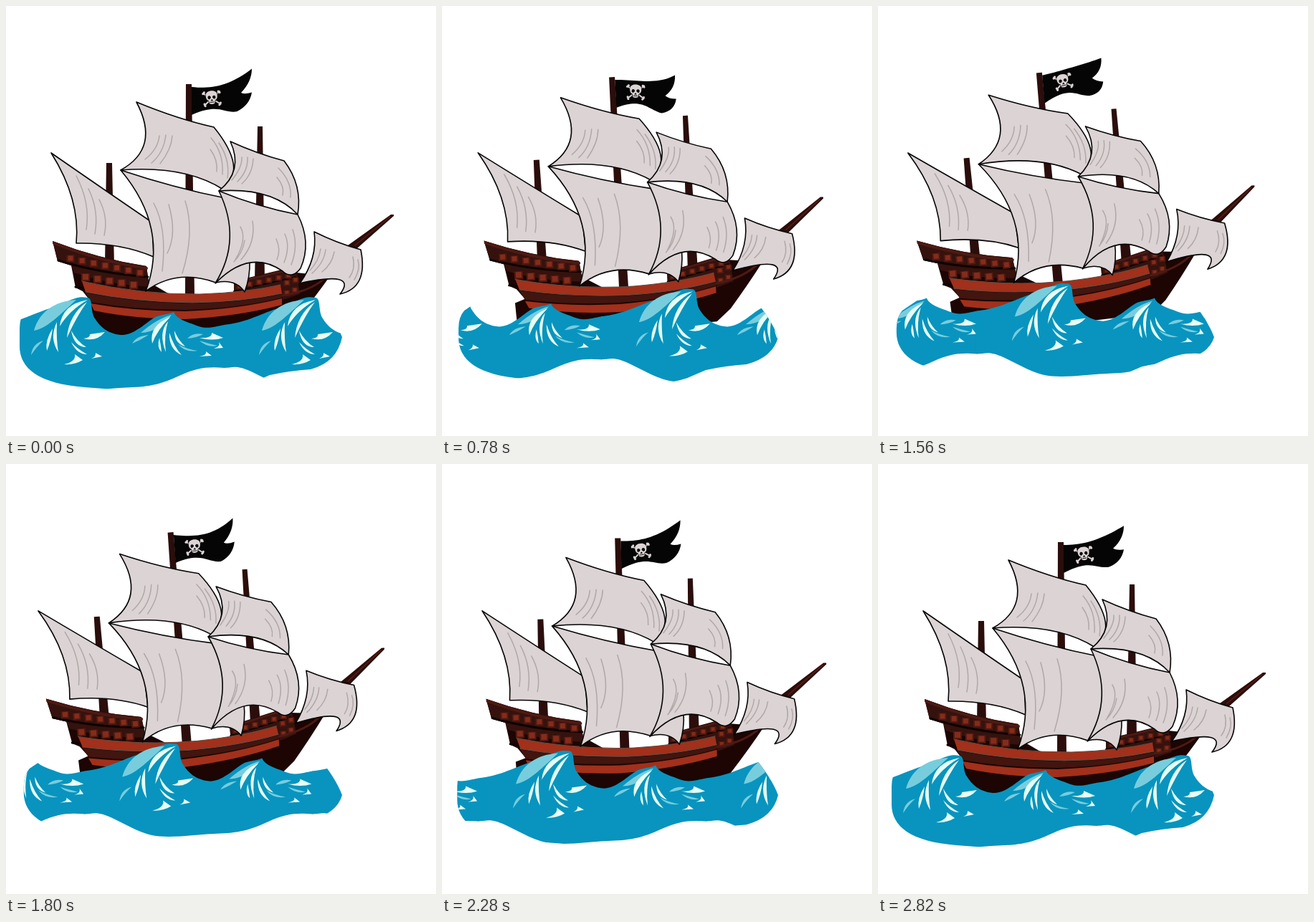
Recreate the animation shown at these times as an HTML page with a canvas. Size 600 by 600 pixels, loop 2880 ms.

```html
<!DOCTYPE html>
<html lang="en">
<head>
<meta charset="utf-8">
<title>Pirate ship</title>
<style>
html, body { margin: 0; width: 100%; height: 100%; overflow: hidden; background: #fff; }
canvas { display: block; }
</style>
</head>
<body>
<canvas id="stage" width="600" height="600"></canvas>
<script>
const ctx = document.getElementById('stage').getContext('2d');
const STEP = 60, COUNT = 48, PERIOD = 318, TAU = Math.PI * 2;
const WOOD = '#2b0e0b', DARK = '#1c0503', RED = '#a2301b', SAIL = '#dcd3d4', BLACK = '#050505';

function fill(path, color) {
  ctx.fillStyle = color;
  ctx.fill(new Path2D(path));
}

function line(path, color, width) {
  ctx.strokeStyle = color;
  ctx.lineWidth = width;
  ctx.stroke(new Path2D(path));
}

function sail(path, folds) {
  fill(path, SAIL);
  line(path, BLACK, 1.6);
  if (folds) line(folds, '#b0a8a8', 1.5);
}

// Row of gun ports along a straight line
function ports(count, x0, y0, x1, y1, size) {
  for (let i = 0; i < count; i++) {
    const f = i / (count - 1), x = x0 + (x1 - x0) * f, y = y0 + (y1 - y0) * f;
    ctx.fillStyle = '#52190f';
    ctx.fillRect(x - size / 2 - 2, y - size / 2 - 1, size + 4, size + 3);
    ctx.fillStyle = '#842c1c';
    ctx.fillRect(x - size / 2, y - size / 2, size, size);
  }
}

function drawSkull() {
  ctx.scale(0.9, 0.9);
  line('M-13 -8 L13 11 M13 -9 L-12 11', SAIL, 2.2);
  ctx.fillStyle = SAIL;
  for (const [x, y] of [[-13, -7], [-11, -9], [13, -7], [11, -9], [-12, 9], [-11, 12], [13, 9], [11, 12]]) {
    ctx.beginPath();
    ctx.arc(x, y, 1.7, 0, TAU);
    ctx.fill();
  }
  const head = 'M-9 -4 C-9 -13 9 -13 9 -4 Q9 3 5 4 L4 9 Q0 11 -4 9 L-5 4 Q-9 3 -9 -4Z';
  line(head, BLACK, 1.5);
  fill(head, SAIL);
  fill('M-6 -2 Q-3 -5 -1 -1 Q-3 4 -6 1Z M6 -2 Q3 -5 1 -1 Q3 4 6 1Z M0 2 L2 5 L-2 5Z', BLACK);
  line('M-3 7 H3', BLACK, 1);
}

function drawFlag(n) {
  const phase = n * 5 / COUNT;
  const lift = s => -14 * s ** 3 - 13 * s * Math.cos(TAU * (phase - 0.64 - 0.28 * s));
  ctx.save();
  ctx.translate(259, 113);
  ctx.beginPath();
  ctx.moveTo(0, 0);
  for (let s = 0.05; s < 1.01; s += 0.05) ctx.lineTo(84 * s, lift(s));
  ctx.quadraticCurveTo(84, lift(1) + 18, 69, lift(0.82) + 23);
  ctx.quadraticCurveTo(74, lift(0.88) + 29, 84, lift(1) + 33);
  ctx.quadraticCurveTo(81, lift(0.95) + 48, 63, lift(0.75) + 46);
  ctx.bezierCurveTo(44, lift(0.5) + 40, 38, lift(0.4) + 23, 0, 39);
  ctx.closePath();
  ctx.fillStyle = BLACK;
  ctx.fill();
  ctx.translate(28, 15 + lift(0.33));
  ctx.rotate((lift(0.5) - lift(0.15)) / 40);
  drawSkull();
  ctx.restore();
}

function drawHull() {
  fill('M541 291 L537 291 L484 329 L400 388 L420 394 L490 338 L541 293Z', WOOD);
  line('M536 294 L487 334', '#5a1c13', 1.5);
  fill('M65 328 L72 356 L91 362 L97 393 L107 398 L118 412 L104 417 L106 458 Q200 475 300 460 L384 457 L404 440 Q430 408 452 377 L405 372 L405 363 L318 384 L318 400 Q270 404 228 402 L199 385 L196 363 Q130 353 65 328Z', DARK);
  fill('M65 328 Q130 353 196 363 L200 392 Q140 388 95 372 L91 362 L72 356Z', '#35120d');
  line('M67 331 Q130 356 196 366', '#4d1a13', 4);
  line('M73 355 Q130 373 198 378 M97 392 Q150 402 216 402', '#0d0302', 3);
  ports(7, 90, 352, 187, 372, 7);
  ports(5, 111, 378, 178, 389, 8);

  fill('M318 385 L405 364 L410 402 L386 410 L383 391 L318 400Z', '#35120d');
  line('M318 386 L404 366', '#4d1a13', 3);
  line('M318 398 L404 378', '#0d0302', 2);
  ports(6, 326, 391, 394, 376, 5);
  ports(2, 392, 386, 404, 382, 5);
  ports(2, 392, 400, 403, 396, 5);

  fill('M106 384 Q190 403 270 402 Q335 400 383 389 L385 401 Q330 413 260 414 Q180 413 111 399Z', RED);
  fill('M111 400 Q180 414 260 415 Q330 414 385 402 L385 407 Q325 422 250 424 Q180 424 118 413Z', '#42150f');
  fill('M118 415 Q180 426 250 426 Q325 423 385 408 L385 417 Q325 433 250 437 Q180 437 123 425Z', RED);
  line('M106 384 Q190 403 270 402 Q335 400 383 389 M111 399 Q180 413 260 414 Q330 413 385 401', '#5a5048', 1);
  line('M386 404 Q425 398 446 379', '#4d1a13', 3);
}

function drawShip(n, swing) {
  ctx.save();
  ctx.translate(53, 456);
  ctx.rotate(-5 * Math.PI / 180 * swing);
  ctx.translate(-53, -456);
  ctx.lineJoin = ctx.lineCap = 'round';
  fill('M251 109 H259 L263 404 H250Z M351 168 H358 L361 384 H347Z M140 219 H148 L151 362 H138Z', WOOD);
  drawHull();
  drawFlag(n);

  sail('M63 205 Q135 255 204 302 L206 350 Q160 330 98 331 Q104 270 63 205Z',
    'M98 237 Q118 275 112 312 M115 255 Q130 285 124 318 M130 270 Q143 295 137 320');
  sail('M293 386 Q320 380 333 399 Q341 378 340 355 L305 355Z');
  sail('M160 229 Q235 254 306 268 Q336 328 293 386 Q238 366 195 398 Q228 310 160 229Z',
    'M206 275 Q225 310 218 370 M227 277 Q239 318 225 345 M250 272 Q264 315 246 373');
  sail('M182 134 Q240 158 290 169 Q338 228 303 256 Q250 222 160 229 Q216 198 182 134Z',
    'M223 180 Q220 205 203 219 M214 181 Q212 200 194 214 M232 181 Q231 200 215 220 M286 184 Q304 205 302 235 M297 191 Q313 215 309 240 M285 200 Q296 215 294 231');
  sail('M297 258 Q350 280 407 291 Q427 330 411 366 Q399 382 386 370 Q340 338 292 387 Q330 326 297 258Z',
    'M327 308 Q337 325 320 354 M344 300 Q349 330 328 354 M333 327 Q330 345 318 357 M389 318 Q397 335 388 358 M400 312 Q408 335 398 361 M377 325 Q384 340 378 354');
  sail('M313 189 Q350 206 388 216 Q414 250 407 291 Q372 253 297 258 Q332 230 313 189Z',
    'M337 211 Q338 230 323 245 M345 213 Q344 235 329 248 M329 211 Q330 225 315 243 M380 226 Q399 245 397 267 M378 239 Q389 252 386 264');
  sail('M430 315 Q462 331 495 340 Q506 393 466 402 Q492 369 410 387 Q435 352 430 315Z',
    'M446 340 Q444 358 427 373 M458 343 Q455 360 441 371 M439 339 Q437 355 424 369 M484 350 Q488 367 479 379 M491 354 Q495 367 486 382');
  ctx.restore();
}

const WATER = 'M-130 445 C-100 442 -85 432 -55 422 S-20 404 -2 407 C6 409 1 425 8 436 S25 457 44 459 S85 436 95 433 S112 430 118 427 C122 437 135 440 150 446 S175 447 189 445 L189 505 C165 503 150 505 128 515 S90 531 60 532 S0 538 -25 536 S-70 520 -92 510 S-118 505 -130 505Z';

const SHADE = 'M-18 410 C-50 412 -70 428 -77 453 C-60 450 -45 435 -18 410Z M-81 487 Q-79 471 -64 467 Q-73 475 -81 487Z'
  + 'M115 431 Q95 436 72 456 Q98 455 115 431Z M60 471 Q66 460 83 459 Q72 466 60 471Z M137 464 Q145 455 159 458 Q150 463 137 464Z M124 472 Q134 484 151 481 Q137 479 124 472Z M154 467 Q165 477 179 474 Q166 471 154 467Z';

const FOAM = 'M-2 410 Q-38 416 -41 447 Q-28 425 -2 410Z M-3 413 Q-28 430 -31 463 Q-17 432 -3 413Z M-45 441 Q-56 463 -43 483 Q-46 465 -45 441Z M-51 450 Q-62 467 -59 481 Q-53 467 -51 450Z'
  + 'M-25 453 Q-21 476 -4 476 Q-17 468 -25 453Z M-25 469 Q-17 486 -3 486 Q-16 479 -25 469Z M-8 464 Q2 463 1 458 L22 455 Q10 469 -8 464Z M-35 500 Q-18 496 -20 486 L-9 494 Q-20 501 -35 500Z M3 492 Q10 489 9 484 L18 489Z'
  + 'M113 434 Q83 446 88 471 Q95 452 113 434Z M110 440 Q96 456 107 483 Q104 460 110 440Z M112 456 Q111 479 129 487 Q118 475 112 456Z M119 453 Q119 471 134 475 Q124 466 119 453Z M98 463 Q94 476 101 483 Q100 472 98 463Z'
  + 'M154 463 Q172 464 171 456 L187 463 Q172 468 154 463Z M174 478 Q184 475 181 469 L187 477Z M154 489 Q165 487 163 482 L171 488Z';

function drawSea(n, swing) {
  const left = 19 + 7 * swing, rise = y => y - 20 * swing, drop = y => y - 12 * swing;
  ctx.save();
  ctx.clip(new Path2D(`M${left} ${rise(475)} C${left} ${rise(505)} ${left + 26} ${rise(527)} ${left + 91} ${rise(532)}
    L190 ${rise(538)} H300 Q330 ${drop(532)} 347 ${drop(524)} L368 ${drop(515)} Q395 ${drop(509)} 425 ${drop(507)}
    Q462 ${drop(497)} 469 462 Q460 438 435 408 L430 370 H${left + 42} V402 L${left + 8} 425 Q${left} 434 ${left} 450Z`));
  const crest = 434 - PERIOD * n / (COUNT - 1) + 10 * swing;
  ctx.translate(crest - PERIOD, -20 * swing);
  for (let i = 0; i < 3; i++) {
    fill(WATER, '#0894bf');
    ctx.fillRect(-131, 446, 4, 58);
    fill(SHADE, '#78cddd');
    fill(FOAM, '#e6fff3');
    ctx.translate(PERIOD, 0);
  }
  ctx.restore();
}

function draw(now) {
  const n = Math.floor(now / STEP) % COUNT;
  const swing = (1 - Math.cos(TAU * n / (COUNT - 1))) / 2;
  ctx.clearRect(0, 0, 600, 600);
  drawShip(n, swing);
  drawSea(n, swing);
  requestAnimationFrame(() => draw(performance.now()));
}
draw(0);
</script>
</body>
</html>
```
